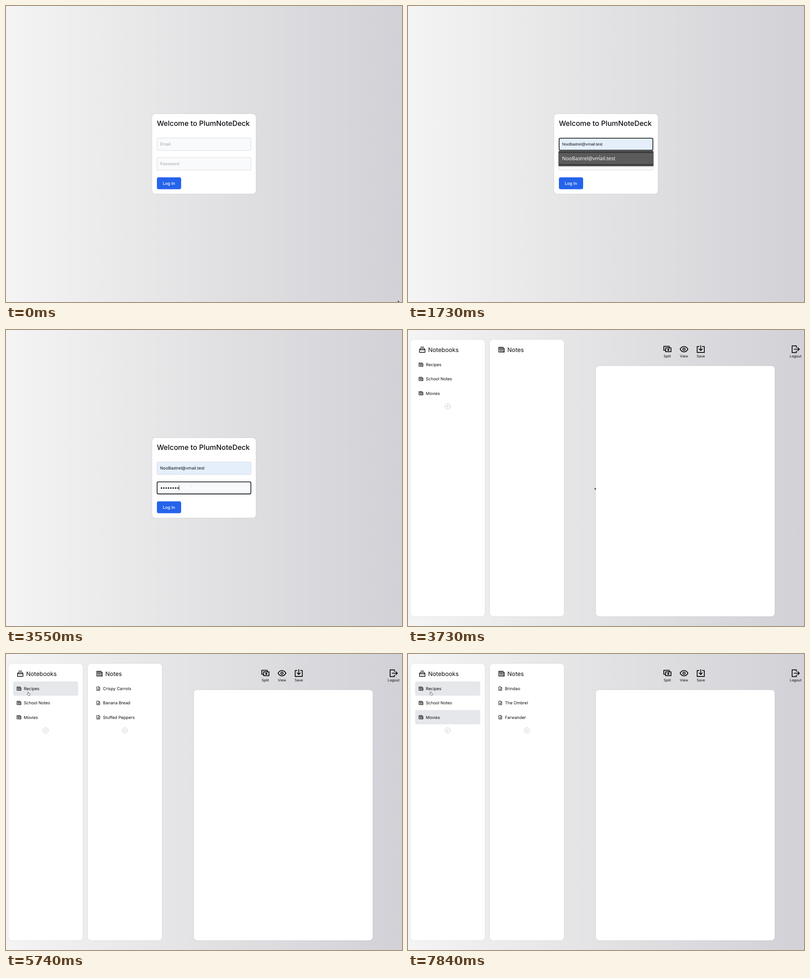
These frames come from a looping animation (866 by 647 pixels, 8 s). An HTML page:

```html
<!DOCTYPE html>
<html lang="en">
<head>
<meta charset="utf-8">
<title>Notes demo</title>
<style>
  html, body { margin: 0; width: 100%; height: 100%; overflow: hidden; background: #e3e3e5; }
  svg { display: block; width: 866px; height: 647px; }
  text { font-family: Inter, sans-serif; font-size: 9.1px; fill: #0b0d12; text-rendering: geometricPrecision; }
  .panel { fill: #fff; filter: drop-shadow(0 .7px 1px #0002); }
  .title { font-size: 13px; }
  .label { font-size: 7.8px; text-anchor: middle; }
  .icon { fill: none; stroke: #000; stroke-linecap: round; stroke-linejoin: round; }
  .add { fill: none; stroke: #c6c8cc; stroke-width: 1; }
  .field { fill: #f9fafb; stroke: #d1d5db; stroke-width: .8; }
  .field.filled { fill: #e5effb; stroke: #c8d3e2; }
  .field.focus { stroke: #0a0c12; stroke-width: 1.6; }
  .hint { fill: #9ca8b1; }
  .plain { font-family: "Liberation Sans", Arial, sans-serif; font-size: 8.67px; }
  .option { font-family: "Noto Sans", sans-serif; font-size: 10.9px; font-weight: 500; fill: #fff; }
</style>
</head>
<body>
<svg id="stage" viewBox="0 0 866 647"></svg>
<script>
const LOOP = 8000;
const ROW_TOP = 60, ROW_STEP = 31.25;
const EMAIL = 'NooBastrel@vmail.test';
const notebooks = ['Recipes', 'School Notes', 'Movies'];
const noteLists = [
  ['Crispy Carrots', 'Banana Bread', 'Stuffed Peppers'],
  ['Linear Algebra', 'Calculus Review'],
  ['Brindao', 'The Ombrel', 'Farwander']
];

// Moments at which something switches
const at = {
  emailFocus: 890, menuOpen: 960, menuHover: 1590, menuPick: 1870,
  passwordFocus: 2160, app: 3730, opened: [5740, 6350, 7000]
};
const keyTimes = [2850, 2920, 2990, 3130, 3220, 3320, 3410, 3550];

// Pointer: time, x, y
const pointerPath = [
  [0, 857, 643], [50, 857, 643], [840, 432, 300], [1540, 432, 300],
  [1730, 419, 329], [1870, 419, 331], [2140, 405, 340], [2330, 405, 339.5],
  [3729, 405, 339.5], [3730, 408, 344], [4480, 408, 344], [4950, 52, 82],
  [5130, 52, 82], [5320, 51, 103], [5550, 48.6, 83], [6070, 48.6, 83],
  [6160, 48.6, 105], [6490, 48.6, 105], [6770, 50, 128], [7470, 50, 128],
  [7840, 49.6, 82.4], [LOOP, 49.6, 82.4]
];

const icons = {
  split: 'M-4.6 2.4H-7.6V-6.3H4.4V-3.4M-3.6-2.9H8.2V5.4H-3.6ZM3.7 1.2A1.4 1.4 0 1 1 .9 1.2A1.4 1.4 0 1 1 3.7 1.2Z',
  view: 'M-8.6 0Q-5.2-5.8 0-5.8T8.6 0Q5.2 5.8 0 5.8T-8.6 0ZM2.5 0A2.5 2.5 0 1 1-2.5 0A2.5 2.5 0 1 1 2.5 0Z',
  save: 'M-3.8-5.8H-7.8V7.2H7.8V-5.8H3.8M0-7.8V2.8M-3.5-.6L0 2.9L3.5-.6',
  logout: 'M1.8-4V-7.3H-7.6V7.3H1.8V4M-3 0H8.2M4.8-3.5L8.3 0L4.8 3.5',
  stack: 'M-6 .2L-4.3-2.6H4.3L6 .2V5.7H-6ZM-6 .2H6M-3.2-5.6H3.2',
  news: 'M-6-5.3H3.4V5.3H-6ZM3.4-2.6H6V5.3H3.4M-3.5-2.9H.9V.1H-3.5ZM-3.5 2.8H.9',
  page: 'M-3.1-4H.9L3.1-1.7V4H-3.1ZM.9-4V-1.7H3.1M-1.3.4H1.3M-1.3 2.1H1.3'
};

const pointers = {
  arrow: '<path d="M0 0V5.4L1.3 4.3L2.2 6.2L3.1 5.8L2.2 4H3.8Z" fill="#111" stroke="#fff" stroke-width=".4"/>',
  beam: '<path d="M0-2.8v1M0 1.8v1" stroke="#8d9196" stroke-width=".9"/>',
  light: '<path d="M0-3V3.4M0-3L1.8-.8" fill="none" stroke="#c4c4c4" stroke-width=".7"/>',
  hand: '<path d="M-.9.9a.9.9 0 0 1 1.8 0V3l2.6.7q1 .4.8 1.4L3.6 7.6H.1L-2.5 5q.2-1.1 1.6-.3Z" fill="#fff" stroke="#333" stroke-width=".7"/>'
};

const rect = (x, y, w, h, r, attrs) =>
  `<rect x="${x}" y="${y}" width="${w}" height="${h}" rx="${r}" ${attrs}/>`;
const text = (x, y, s, attrs = '') => `<text x="${x}" y="${y}" ${attrs}>${s}</text>`;
const icon = (name, x, y, width, scale = 1) =>
  `<path class="icon" d="${icons[name]}" stroke-width="${width}" transform="translate(${x} ${y}) scale(${scale})"/>`;
const panel = (x, y, w, h) => rect(x, y, w, h, 7.5, 'class="panel"');
const addButton = (x, y) =>
  `<path class="add" d="M${x - 2.7} ${y}h5.4M${x} ${y - 2.7}v5.4"/><circle class="add" cx="${x}" cy="${y}" r="5.8"/>`;
const tool = (name, label, x) => icon(name, x, 42, 1.7) + text(x, 60, label, 'class="label"');
const rowMiddle = i => ROW_TOP + ROW_STEP * i + 15.7;

function pointerAt(t) {
  const i = Math.max(1, pointerPath.findIndex(p => p[0] > t));
  const [t0, x0, y0] = pointerPath[i - 1], [t1, x1, y1] = pointerPath[i];
  const u = (t - t0) / (t1 - t0), k = u * u * (3 - 2 * u);
  return { x: x0 + (x1 - x0) * k, y: y0 + (y1 - y0) * k };
}

function field(y, focused, filled) {
  const inset = focused ? .5 : .1;
  return rect(330 + inset, y + inset, 206 - 2 * inset, 27.4 - 2 * inset, 2.6,
    `class="field ${filled ? 'filled' : ''} ${focused ? 'focus' : ''}"`);
}

const caret = (x, y) => rect(x, y - 5.6, .8, 11.2, 0, 'fill="#111"');

function login(t) {
  const emailFocus = t >= at.emailFocus && t < at.passwordFocus;
  const passwordFocus = t >= at.passwordFocus;
  const preview = t >= at.menuHover, picked = t >= at.menuPick;
  const typed = keyTimes.filter(k => k <= t).length;

  let out = panel(319.5, 236, 227, 174.6)
    + text(330, 262.4, 'Welcome to PlumNoteDeck', 'style="font-size:15.6px;font-weight:500"')
    + field(288.5, emailFocus, preview)
    + field(331.5, passwordFocus, false)
    + rect(330, 374.4, 53, 26.2, 4, 'fill="#2563eb"')
    + text(356.3, 390.7, 'Log In', 'text-anchor="middle" style="fill:#fff;font-weight:500"');

  if (picked) out += text(337, 305.2, EMAIL);
  else if (preview) out += text(337, 305.2, EMAIL, 'class="plain"');
  else out += text(337, 305.2, 'Email', 'class="hint"');
  if (emailFocus && t < 1400) out += caret(336.8, 302);

  if (!typed) out += text(337, 348.3, 'Password', 'class="hint"');
  for (let i = 0; i < typed; i++) out += `<circle cx="${340 + 5.15 * i}" cy="345.4" r="1.6" fill="#111"/>`;
  if (passwordFocus && (typed || t < 2660)) out += caret(336.9 + 5.15 * typed, 345);

  if (t >= at.menuOpen && !picked) {
    out += rect(329.3, 316.8, 207.4, 33, 1.5, 'fill="#3c3c3c" style="filter:drop-shadow(0 1px 1px #0005)"');
    if (preview) out += rect(329.3, 321.3, 207.4, 24.2, 0, 'fill="#5b5b5b"');
    out += text(337, 337.2, EMAIL, 'class="option"');
  }
  return out;
}

function workspace(t, hovered) {
  const active = at.opened.filter(k => k <= t).length - 1;
  let out = panel(5.4, 21, 162.8, 605) + panel(178.8, 21, 162.4, 605) + panel(410.8, 78.4, 391.2, 547.6)
    + icon('stack', 31.2, 43, 1.35) + text(44, 47.8, 'Notebooks', 'class="title"')
    + icon('news', 204.6, 43, 1.35) + text(217.3, 47.8, 'Notes', 'class="title"')
    + tool('split', 'Split', 567) + tool('view', 'View', 603.6)
    + tool('save', 'Save', 640.2) + tool('logout', 'Logout', 847.6)
    + addButton(86.6, 167);

  notebooks.forEach((name, i) => {
    const y = rowMiddle(i);
    if (i === active || i === hovered)
      out += rect(15.6, ROW_TOP + ROW_STEP * i + .1, 142.4, 31.2, 4, 'fill="#e5e7eb"');
    out += icon('news', 28.6, y, 1.35, .72) + text(39, y + 3.3, name);
  });

  if (active >= 0) {
    const notes = noteLists[active];
    notes.forEach((name, i) => {
      const y = rowMiddle(i);
      out += icon('page', 202, y, .9) + text(212, y + 3.3, name);
    });
    out += addButton(259.8, 167 - ROW_STEP * (3 - notes.length));
  }
  return out;
}

function pointerKind(t, hovered) {
  if (t >= at.app) return hovered >= 0 ? 'hand' : 'arrow';
  if (t < 790) return 'arrow';
  return t >= at.menuHover && t < at.menuPick ? 'light' : 'beam';
}

const backdrop = `<defs><linearGradient id="shade">
  <stop stop-color="#f4f4f4"/><stop offset=".5" stop-color="#e2e2e4"/><stop offset="1" stop-color="#d2d1d7"/>
</linearGradient></defs>` + rect(0, 0, 866, 647, 0, 'fill="url(#shade)"');
const stage = document.getElementById('stage');
stage.innerHTML = backdrop + '<g id="scene"></g><g id="pointer"></g>';
const scene = document.getElementById('scene');
const pointer = document.getElementById('pointer');
let lastScene = '', lastKind = '';

function render(t) {
  const { x, y } = pointerAt(t);
  const row = Math.floor((y - ROW_TOP) / ROW_STEP);
  const hovered = x > 15.6 && x < 158 && row >= 0 && row < 3 ? row : -1;
  const markup = t < at.app ? login(t) : workspace(t, hovered);
  if (markup !== lastScene) scene.innerHTML = lastScene = markup;
  const kind = pointerKind(t, hovered);
  if (kind !== lastKind) pointer.innerHTML = pointers[lastKind = kind];
  pointer.setAttribute('transform', `translate(${x.toFixed(2)} ${y.toFixed(2)})`);
}

const start = performance.now();
function tick() {
  render((performance.now() - start) % LOOP);
  requestAnimationFrame(tick);
}
tick();
</script>
</body>
</html>
```
